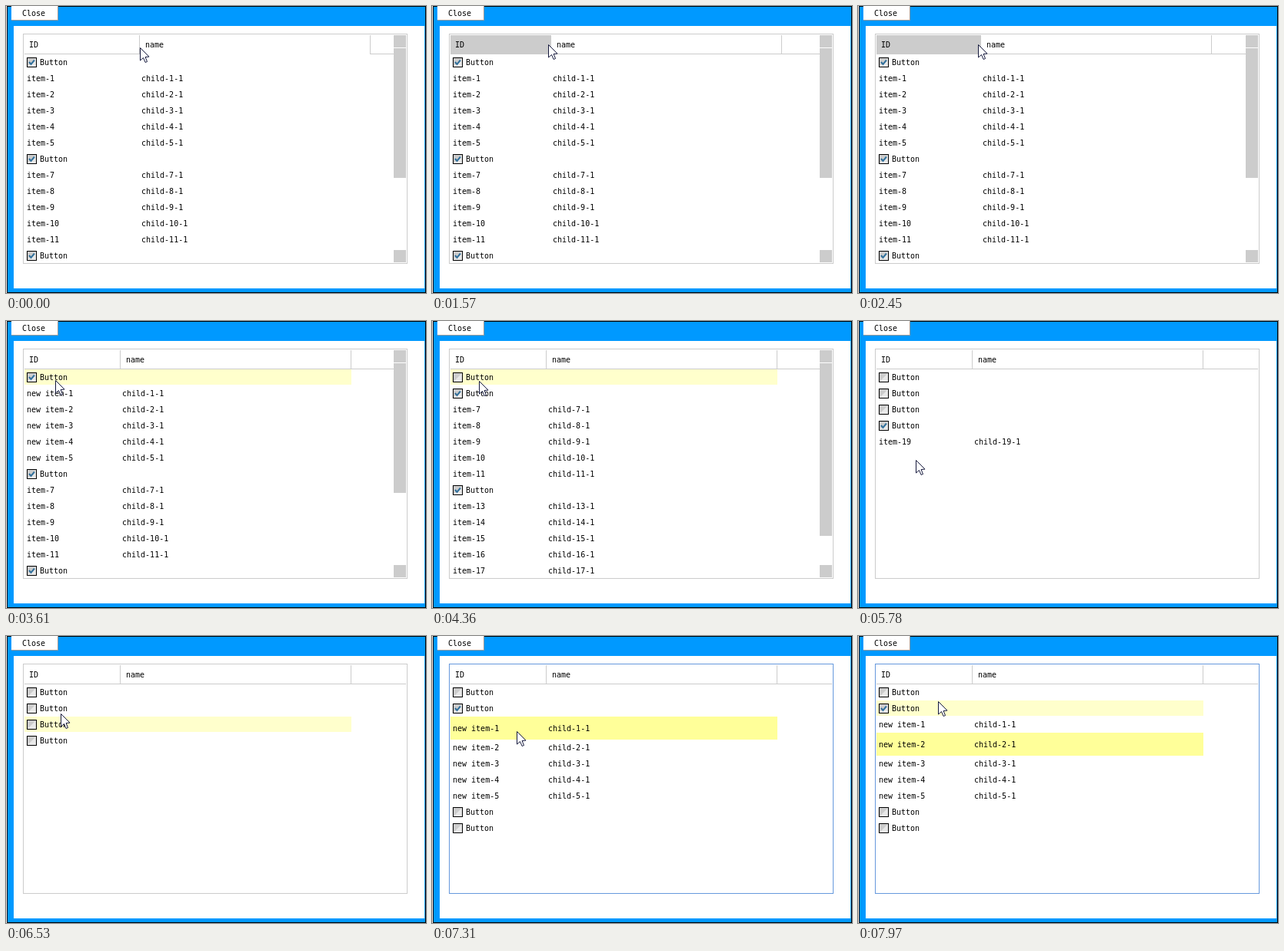
Animation of 546x374 px, one loop 8000 ms. Source, as an HTML page with a canvas:

```html
<!DOCTYPE html>
<html>
<head>
<meta charset="utf-8">
<style>
html, body { margin: 0; width: 546px; height: 374px; overflow: hidden; }
canvas { display: block; }
</style>
</head>
<body>
<canvas id="stage" width="546" height="374"></canvas>
<script>
const ctx = document.getElementById('stage').getContext('2d');
const LOOP = 8000, ROW = 21, TALL = 30, TOP = 63, VIEW = 271;
const TRAVEL = 210, LAG = 60;
const DRAG_START = 930, DRAG_END = 2570;
const GREY = '#cccccc', HEAD = -1.15;

// The pointer arrives at each step's place at its time, then may act there.
const steps = [];
function move(at, x, row, action = {}) {
  steps.push({ at, x, y: TOP + ROW * (row + .55), ...action });
}
const toggle = group => ({ group });
const select = item => ({ item });

move(0, 174, -1);
move(500, 174, -1.1);
move(650, 172, HEAD);
move(1570, 151, HEAD);
move(1840, 108, HEAD);
move(2270, 165, HEAD);
move(DRAG_END, 145, HEAD);
move(2780, 64, .1, toggle(0));
move(3270, 64, .1, toggle(0));
move(3960, 66, 1);
move(4180, 60, 0, toggle(0));
move(4540, 66, 1, toggle(1));
move(4660, 84, .3);
move(5030, 89, 2.15);
move(5300, 60, 2, toggle(2));
move(5720, 75, 5.05);
move(6110, 68, 3, toggle(3));
move(6560, 72, 1, toggle(1));
move(7100, 105, 1.9);
move(7300, 110, 2.35, select(1));
move(7640, 108, 3.4, select(2));
move(7970, 104, .5);

function pointer(t) {
  const next = steps.findIndex(s => s.at > t);
  if (next === 0) return pointer(0);
  const a = steps.at(next < 0 ? -1 : next - 1), b = steps.at(next);
  const begin = Math.max(a.at, b.at - TRAVEL);
  const k = next < 0 ? 0 : Math.max(0, (t - begin) / (b.at - begin));
  return [a.x + (b.x - a.x) * k, a.y + (b.y - a.y) * k].map(Math.round);
}

function divider(t) {
  return t < DRAG_START ? 173 : pointer(Math.min(t, DRAG_END))[0] + 3;
}

function listRows(t) {
  const done = steps.filter(s => s.at <= t);
  const selected = done.findLast(s => s.item)?.item;
  const rows = [];
  for (let g = 0; g < 4; g++) {
    const clicks = done.filter(s => s.group === g).length;
    const open = clicks % 2 === 0;
    rows.push({ button: true, open });
    const count = g === 3 ? 1 : 5;
    for (let i = 1; open && i <= count; i++) {
      const id = clicks ? i : g * 6 + i;
      rows.push({
        id: (clicks ? 'new ' : '') + 'item-' + id,
        name: `child-${id}-1`,
        selected: clicks > 0 && i === selected
      });
    }
  }
  let y = TOP;
  for (const r of rows) {
    r.y = y;
    r.h = r.selected ? TALL : ROW;
    y += r.h;
  }
  return { rows, focused: selected > 0 };
}

function rect(color, x, y, w, h) {
  ctx.fillStyle = color;
  ctx.fillRect(x, y, w, h);
}

function frame(color, x, y, w, h) {
  ctx.strokeStyle = color;
  ctx.lineWidth = 1;
  ctx.strokeRect(x + .5, y + .5, w - 1, h - 1);
}

function text(s, x, y) {
  ctx.fillStyle = '#000';
  ctx.fillText(s, x, y);
}

function poly(points) {
  ctx.beginPath();
  points.forEach(p => ctx.lineTo(...p));
}

function checkbox(x, y, on) {
  rect('#e8e8e8', x, y, 13, 13);
  frame('#000', x, y, 13, 13);
  poly([[x + 1, y + 1], [x + 12, y + 1], [x + 1, y + 12]]);
  ctx.fillStyle = GREY;
  ctx.fill();
  if (!on) return;
  poly([[x + 3, y + 6], [x + 5.5, y + 9], [x + 10, y + 3.5]]);
  ctx.strokeStyle = '#33719c';
  ctx.lineWidth = 2;
  ctx.stroke();
}

function arrow(x, y) {
  poly([[0, 0], [0, 16.5], [4, 13], [6.6, 19], [9, 18], [6.6, 12], [11.5, 11.6]]
    .map(p => [x + .5 + p[0], y + .5 + p[1]]));
  ctx.closePath();
  ctx.fillStyle = '#fff';
  ctx.fill();
  ctx.strokeStyle = '#14183c';
  ctx.lineWidth = 1;
  ctx.stroke();
}

function windowFrame() {
  rect('#fff', 0, 0, 1, 374);
  rect('#000', 1, 0, 545, 374);
  rect('#0099ff', 2, 1, 543, 372);
  rect('#fff', 10, 26, 534, 342);
  rect('#999', 7, 0, 61, 19);
  rect('#fff', 7, 0, 60, 18);
  text('Close', 21, 13);
}

function header(t, sep, hx, hy) {
  const pressed = t >= DRAG_START && t < DRAG_END;
  const edges = [23, sep, sep + 300, 520];
  if (pressed) rect(GREY, 24, 38, sep - 24, 25);
  for (let i = 0; i < 3; i++) {
    const from = edges[i] + 1, to = edges[i + 1];
    const hot = !pressed && hy < TOP && hx >= edges[i] && hx < to;
    if (!hot) rect(GREY, from, 62, to - from, 1);
    if (i < 2) rect(GREY, to, 38, 1, 25);
  }
  text('ID', 30, 54);
  text('name', sep + 8, 54);
}

function scrollbar(count) {
  if (count * ROW <= VIEW) return;
  rect('#fff', 504, 38, 16, 296);
  rect(GREY, 504, 38, 16, 16);
  rect(GREY, 504, 55, 16, Math.round(262 * VIEW / (count * ROW)));
  rect(GREY, 504, 318, 16, 16);
}

function draw(t) {
  const sep = divider(t), { rows, focused } = listRows(t);
  const [hx, hy] = pointer(t - LAG);

  ctx.font = '10px "DejaVu Sans Mono", monospace';
  windowFrame();
  frame(focused ? '#6699dd' : GREY, 22, 36, 500, 300);
  header(t, sep, hx, hy);

  ctx.save();
  ctx.beginPath();
  ctx.rect(24, TOP, 496, VIEW);
  ctx.clip();
  for (const r of rows) {
    const hot = hy >= r.y && hy < r.y + r.h;
    if (r.selected) rect('#ffff99', 24, r.y, sep + 277, r.h);
    else if (hot) rect('#ffffcc', 24, r.y, sep + 277, r.h - 1);
    const base = r.y + Math.floor(r.h / 2) + 4;
    if (r.button) {
      checkbox(27, r.y + 4, r.open);
      text('Button', 44, base);
    } else {
      text(r.id, 27, base);
      text(r.name, sep + 3, base);
    }
  }
  ctx.restore();
  scrollbar(rows.length);
  arrow(...pointer(t));
}

const start = performance.now();
function tick() {
  draw((performance.now() - start) % LOOP);
  requestAnimationFrame(tick);
}
tick();
</script>
</body>
</html>
```
